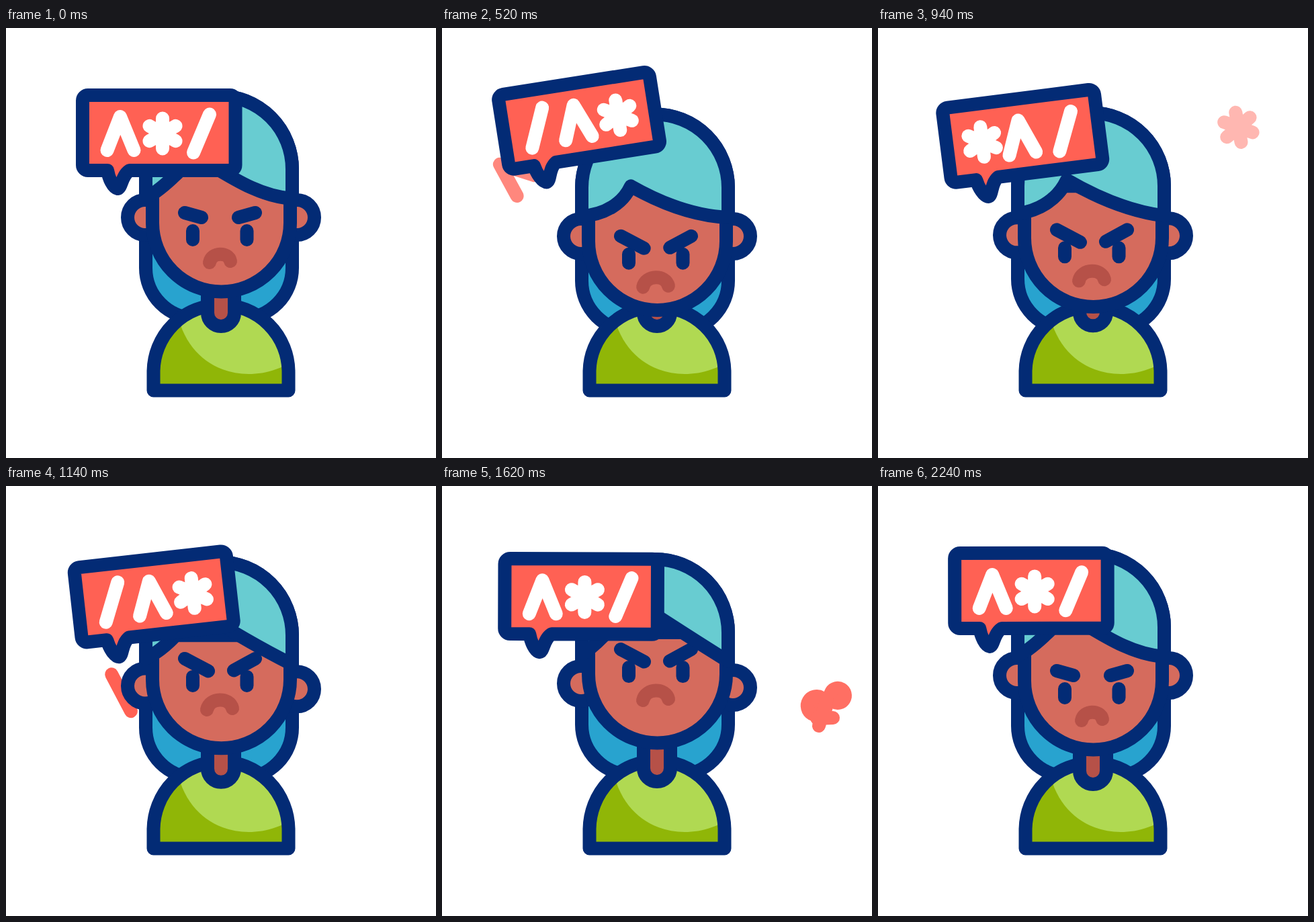
Recreate the animation shown at these times as an HTML page. Size 640 by 640 pixels, loop 2.4 s.

```html
<!DOCTYPE html>
<html lang="en">
<head>
<meta charset="utf-8">
<title>Angry woman</title>
<style>
html, body { margin: 0; width: 100%; height: 100%; overflow: hidden; background: #fff; }
svg { display: block; width: 100vw; height: 100vh; }
.line { stroke: #032b75; stroke-width: 20; stroke-linecap: round; stroke-linejoin: round; }
.open { fill: none; }
.skin { fill: #d56b5d; }
.glyph { fill: none; stroke-width: 20; stroke-linecap: round; stroke-linejoin: round; }
</style>
</head>
<body>
<svg viewBox="0 0 640 640">
  <defs>
    <clipPath id="shirtClip"><path id="shirtArea"/></clipPath>
    <path id="caret" d="M-20 25L-.5 -25L20 25"/>
    <path id="star" d="M0 -22.5V22.5M-19.5 -11.2L19.5 11.2M-19.5 11.2L19.5 -11.2"/>
    <path id="slash" d="M-12 28.5L12 -28.5"/>
    <g id="amp">
      <circle cx="11" cy="-23" r="11" fill="#ff6154"/>
      <circle cx="-8" cy="6" r="14" fill="#ff6154"/>
      <path d="M0 -10L10 30M2 22L22 9"/>
    </g>
  </defs>
  <g id="flying" class="glyph" stroke="#ff6154"></g>
  <path id="backHair" class="line" fill="#28a3cf"/>
  <path id="shirt" fill="#90b607"/>
  <path d="M255 380V425C268 486 314 515 361 515C380 515 398 511 421 500V380Z" fill="#b0d952" clip-path="url(#shirtClip)"/>
  <path id="shirtLine" class="line open"/>
  <path id="neck" class="line" fill="#b65148" d="M300 370V424a20 20 0 0 0 40 0V370"/>
  <circle id="earL" class="line skin" cx="207" r="26"/>
  <circle id="earR" class="line skin" cx="433" r="26"/>
  <path id="face" class="line skin"/>
  <g id="features">
    <path id="mouth" class="glyph" stroke="#b65148"/>
    <path class="line open" d="M278 302V315M358.500 302V315"/>
    <path id="brows" class="line open"/>
  </g>
  <path id="fringe" class="line" fill="#68ccd1"/>
  <g id="bubble">
    <path class="line" fill="#ff6154" d="M-105.500 -56H106a8 8 0 0 1 8 8V48a8 8 0 0 1 -8 8H-43.500C-56 64 -55 82 -61.500 83C-68 82 -74.500 68 -76.500 56H-105.500a8 8 0 0 1 -8 -8V-48a8 8 0 0 1 8 -8Z"/>
    <g id="words" class="glyph" stroke="#fff"></g>
  </g>
</svg>
<script>
const LOOP = 2400;
const $ = id => document.getElementById(id);
const set = (id, name, value) => $(id).setAttribute(name, value);
const clamp = v => Math.max(0, Math.min(1, v));
const easeInOut = u => u < 0.5 ? 2 * u * u : 1 - 2 * (1 - u) * (1 - u);
const easeOut = u => 1 - (1 - u) * (1 - u);

// Each head value is given for three poses: rest, down, up.
const POSES = {
  look: [0, 36, -32], anger: [0, 1, 1],
  chin: [0, 28.5, -10], hair: [210, 238.5, 218], locks: [357, 377, 355],
  earL: [282, 311, 294], earR: [282, 311, 300],
  neck: [0, 0, -4], shoulder: [100, 97, 103]
};
const FRINGE = [
  [208, 253, 228, 243, 252, 220, 281, 190, 330, 218, 372, 250, 426, 254],
  [208, 281, 244, 279, 270, 262, 281, 237, 325, 262, 375, 281, 426, 283],
  [208, 251, 235, 232, 260, 205, 281, 168, 330, 200, 378, 231, 426, 261]
];
const MOVES = [[0, 600, 0, 1], [800, 1300, 1, 2], [1600, 2240, 2, 0]];

// time, x, y, angle of the speech bubble
const BUBBLE = [
  [0, 227.5, 156, 0], [320, 225, 155.8, -2.2], [550, 202, 137, -9.5],
  [740, 208, 154.2, -7.75], [1140, 220, 165, -6.4], [1400, 214.5, 168.8, -2.2],
  [1600, 206, 165, 0], [1800, 224.5, 158, 1.1], [2160, 227.5, 156, 0], [2400, 227.5, 156, 0]
];

const WORDS = [
  { caret: -57, star: 5.5, slash: 63.5 },
  { slash: -63, caret: -4, star: 58.5 },
  { star: -60.5, caret: -3, slash: 64 }
];
const ORDER = [0, 1, 2, 1, 0, 2, 0];

// start time, start point, travel, start angle, spin over the flight
const FLYING = [
  { kind: "caret", start: 220, x: 260, y: 256, dx: -165, dy: -40, angle: -8, spin: -56 },
  { kind: "star", start: 600, x: 379, y: 225, dx: 161, dy: -79, angle: 2, spin: 56 },
  { kind: "slash", start: 1040, x: 242, y: 285, dx: -161, dy: 52, angle: -36.600, spin: -56 },
  { kind: "amp", start: 1340, x: 413, y: 306, dx: 170, dy: 22, angle: -8.400, spin: 56 }
];

function addUse(parent, kind) {
  const el = document.createElementNS("http://www.w3.org/2000/svg", "use");
  el.setAttribute("href", "#" + kind);
  return $(parent).appendChild(el);
}
const letters = {};
for (const kind of ["caret", "star", "slash"]) letters[kind] = addUse("words", kind);
for (const f of FLYING) f.el = addUse("flying", f.kind);

function poseAt(t) {
  let move = MOVES[0];
  for (const m of MOVES) if (t >= m[0]) move = m;
  const [a, b, from, to] = move;
  const p = easeInOut(clamp((t - a) / (b - a)));
  return list => list[from] + (list[to] - list[from]) * p;
}

// Smooth curve through timed points, at rest at both ends.
function track(keys, t, c) {
  let i = 0;
  while (i < keys.length - 2 && t >= keys[i + 1][0]) i++;
  const slope = k => k < 1 || k > keys.length - 2 ? 0 :
    (keys[k + 1][c] - keys[k - 1][c]) / (keys[k + 1][0] - keys[k - 1][0]);
  const [a, b] = [keys[i], keys[i + 1]];
  const d = b[0] - a[0], u = (t - a[0]) / d, v = 1 - u;
  return a[c] * v * v * (1 + 2 * u) + b[c] * u * u * (3 - 2 * u) +
    d * u * v * (slope(i) * v - slope(i + 1) * u);
}

function drawHead(t) {
  const mix = poseAt(t), p = {};
  for (const key in POSES) p[key] = mix(POSES[key]);
  const { anger: a, hair, locks } = p;

  set("backHair", "d", `M208 ${hair}A109 109 0 0 1 426 ${hair}V${locks}` +
    `A75 75 0 0 1 351 ${locks + 75}H283A75 75 0 0 1 208 ${locks}Z`);

  const shirt = `M219.5 539.5V512A100.5 ${p.shoulder} 0 0 1 420.5 512V539.5Z`;
  for (const id of ["shirt", "shirtLine", "shirtArea"]) set(id, "d", shirt);
  set("neck", "transform", `translate(0 ${p.neck})`);

  set("earL", "cy", p.earL);
  set("earR", "cy", p.earR);
  const cy = 290 + p.chin;
  set("face", "d", `M218 ${hair}V${cy}A102.5 102.5 0 0 0 423 ${cy}V${hair}Z`);

  set("features", "transform", `translate(0 ${p.look})`);
  set("brows", "d", `M266 275L${291 + 10 * a} ${282 + 11.5 * a}` +
    `M371 275L${346 - 7 * a} ${282 + 10.5 * a}`);
  set("mouth", "d", `M${303 - 4 * a} ${349 + 2 * a}C${306 - 3 * a} ${333 - a} ` +
    `${331 + 2 * a} ${333 - a} ${334 + 3 * a} ${347 + 2 * a}`);

  const f = FRINGE[0].map((_, i) => mix(FRINGE.map(row => row[i])));
  set("fringe", "d", `M${f[0]} ${f[1]}C${f.slice(2, 8).join(" ")}` +
    `C${f.slice(8).join(" ")}V${hair}A109 109 0 0 0 208 ${hair}Z`);
}

function drawBubble(t) {
  const [x, y, r] = [1, 2, 3].map(c => track(BUBBLE, t, c));
  set("bubble", "transform", `translate(${x} ${y}) rotate(${r})`);
  const word = WORDS[ORDER[Math.floor((t + 200) / 400)]];
  for (const kind in letters)
    letters[kind].setAttribute("transform", `translate(${word[kind]} 1)`);
}

function drawFlying(t) {
  for (const f of FLYING) {
    const u = (t - f.start) / 400;
    const live = u > 0 && u < 1;
    f.el.setAttribute("visibility", live ? "visible" : "hidden");
    if (!live) continue;
    const p = easeOut(u);
    f.el.setAttribute("transform", `translate(${f.x + f.dx * p} ${f.y + f.dy * p}) ` +
      `rotate(${f.angle + f.spin * u})`);
    f.el.setAttribute("opacity", clamp((1 - u) / 0.33));
  }
}

let begin = null;
function frame(now) {
  if (begin === null) begin = now;
  const t = Math.max(0, now - begin) % LOOP;
  drawHead(t);
  drawBubble(t);
  drawFlying(t);
  requestAnimationFrame(frame);
}
requestAnimationFrame(frame);
</script>
</body>
</html>
```
